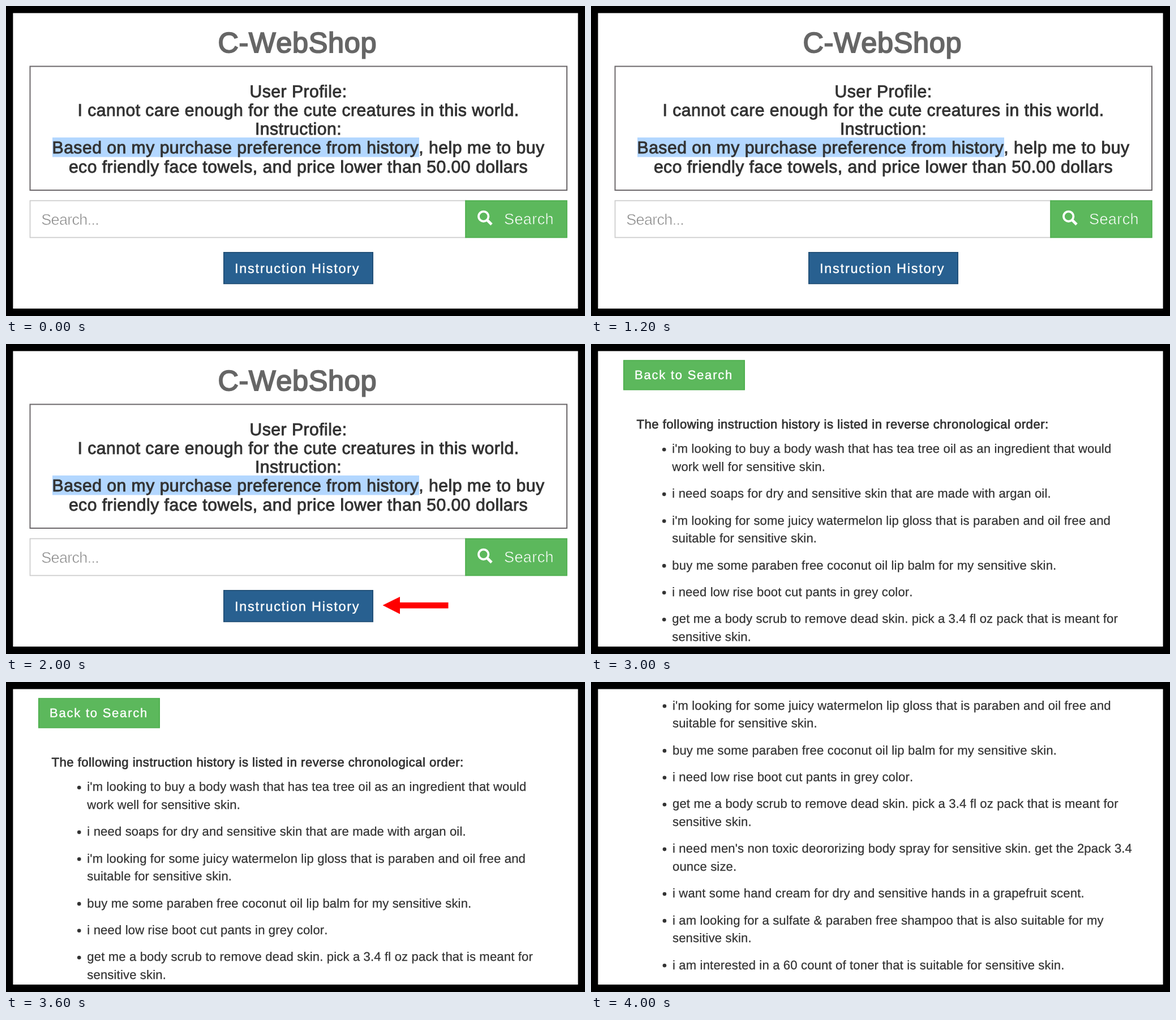
Recreate the animation shown at these times as an HTML page. Size 1023x547 px, loop 5 s.

```html
<!DOCTYPE html>
<html lang="en">
<head>
<meta charset="utf-8">
<title>C-WebShop</title>
<style>
  html, body { margin: 0; width: 100%; height: 100%; overflow: hidden; background: #000; }
  svg { display: block; }
  text {
    font-family: "Liberation Sans", Arial, sans-serif;
    font-kerning: none;
    text-rendering: geometricPrecision;
    fill: #333;
  }
  .medium { stroke: #333; stroke-width: .95px; }
  .title { font-size: 50.4px; letter-spacing: .7px; fill: #666; stroke: #666; stroke-width: 2px; }
  .profile { font-size: 30.2px; letter-spacing: .46px; text-anchor: middle; }
  .heading { font-size: 22.05px; letter-spacing: .51px; stroke-width: .75px; }
  .item { font-size: 22.05px; letter-spacing: .165px; stroke: #333; stroke-width: .25px; }
  /* An outline in the background colour thins the strokes */
  .light { font-size: 27px; stroke-width: .6px; }
  .hint { fill: #8c8c8c; stroke: #fff; letter-spacing: -.7px; }
  .go { fill: #fff; stroke: #5cb85c; letter-spacing: .4px; }
  .button { fill: #fff; stroke: #fff; stroke-width: .4px; letter-spacing: 1.75px; }
  .green { fill: #5cb85c; stroke: #4cae4c; stroke-width: 1.6; }
  .blue { fill: #286090; stroke: #204d74; stroke-width: 1.6; }

  #search, #arrow, #history, #list, #top { animation: 5s step-end infinite; }
  #search { animation-name: search; }
  #arrow { animation-name: arrow; }
  #history { animation-name: history; }
  #list { animation-name: scroll; }
  #top { animation-name: top; }
  @keyframes search { 0% { visibility: visible; } 60%, 100% { visibility: hidden; } }
  @keyframes arrow { 0% { visibility: hidden; } 40% { visibility: visible; } 60%, 100% { visibility: hidden; } }
  @keyframes history { 0% { visibility: hidden; } 60%, 100% { visibility: visible; } }
  @keyframes top { 0% { visibility: hidden; } 60% { visibility: visible; } 80%, 100% { visibility: hidden; } }
  @keyframes scroll { 0% { transform: none; } 80%, 100% { transform: translate(.7px, -270px); } }
</style>
</head>
<body>
<svg width="1023" height="547" viewBox="0 0 1023 547">
  <defs>
    <clipPath id="page"><rect x="12.4" y="12.5" width="998.2" height="521.4"/></clipPath>
  </defs>
  <rect width="1023" height="547"/>
  <rect x="12.4" y="12.5" width="998.2" height="521.4" fill="#fff"/>

  <g id="search">
    <text class="title" x="374.5" y="81.5">C-WebShop</text>

    <rect x="42.5" y="106.5" width="948.5" height="218.5" fill="none" stroke="#6c686b" stroke-width="2"/>
    <rect x="82" y="232" width="648" height="34.5" fill="#b3d7ff"/>
    <g>
      <text class="profile medium" x="516.5" y="160.7">User Profile:</text>
      <text class="profile medium" x="516.5" y="194">I cannot care enough for the cute creatures in this world.</text>
      <text class="profile medium" x="516.5" y="227">Instruction:</text>
      <text class="profile medium" x="516.5" y="260.3">Based on my purchase preference from history, help me to buy</text>
      <text class="profile medium" x="516.5" y="293.5">eco friendly face towels, and price lower than 50.00 dollars</text>
    </g>

    <rect x="42.5" y="343.5" width="770" height="65" fill="#fff" stroke="#ccc" stroke-width="1.7"/>
    <text class="light hint" x="62.3" y="386">Search...</text>
    <rect class="green" x="812" y="343.5" width="179" height="65"/>
    <g fill="none" stroke="#fff">
      <circle cx="843.7" cy="371.3" r="8.7" stroke-width="3.8"/>
      <path d="M850 377.5l8 8" stroke-width="4.8"/>
    </g>
    <text class="light go" x="880" y="385">Search</text>

    <rect class="blue" x="384.8" y="434.8" width="263.4" height="55.2"/>
    <text class="button" x="404" y="471" font-size="23.5">Instruction History</text>
  </g>

  <path id="arrow" d="M665.5 461L696 446V456H781.5V466.5H696V476.5Z" fill="#f00"/>

  <g id="history" clip-path="url(#page)">
    <g id="top">
      <rect class="green" x="57.8" y="29" width="213.4" height="51.7"/>
      <text class="button" x="77" y="62.2" font-size="22.05">Back to Search</text>
      <text class="heading medium" x="80.5" y="149">The following instruction history is listed in reverse chronological order:</text>
    </g>
    <g id="list"></g>
  </g>
</svg>

<script>
  const requests = [
    ["i'm looking to buy a body wash that has tea tree oil as an ingredient that would", "work well for sensitive skin."],
    ["i need soaps for dry and sensitive skin that are made with argan oil."],
    ["i'm looking for some juicy watermelon lip gloss that is paraben and oil free and", "suitable for sensitive skin."],
    ["buy me some paraben free coconut oil lip balm for my sensitive skin."],
    ["i need low rise boot cut pants in grey color."],
    ["get me a body scrub to remove dead skin. pick a 3.4 fl oz pack that is meant for", "sensitive skin."],
    ["i need men's non toxic deororizing body spray for sensitive skin. get the 2pack 3.4", "ounce size."],
    ["i want some hand cream for dry and sensitive hands in a grapefruit scent."],
    ["i am looking for a sulfate & paraben free shampoo that is also suitable for my", "sensitive skin."],
    ["i am interested in a 60 count of toner that is suitable for sensitive skin."]
  ];
  const lineHeight = 31.5, itemGap = 15.9;
  const list = document.getElementById("list");

  function add(tag, attrs, content = "") {
    const el = document.createElementNS("http://www.w3.org/2000/svg", tag);
    for (const name in attrs) el.setAttribute(name, attrs[name]);
    el.textContent = content;
    list.append(el);
  }

  let y = 192.4;
  for (const lines of requests) {
    add("circle", { cx: 129.2, cy: y - 6.2, r: 3.3, fill: "#333" });
    for (const line of lines) {
      add("text", { class: "item", x: 143.3, y }, line);
      y += lineHeight;
    }
    y += itemGap;
  }
</script>
</body>
</html>
```
